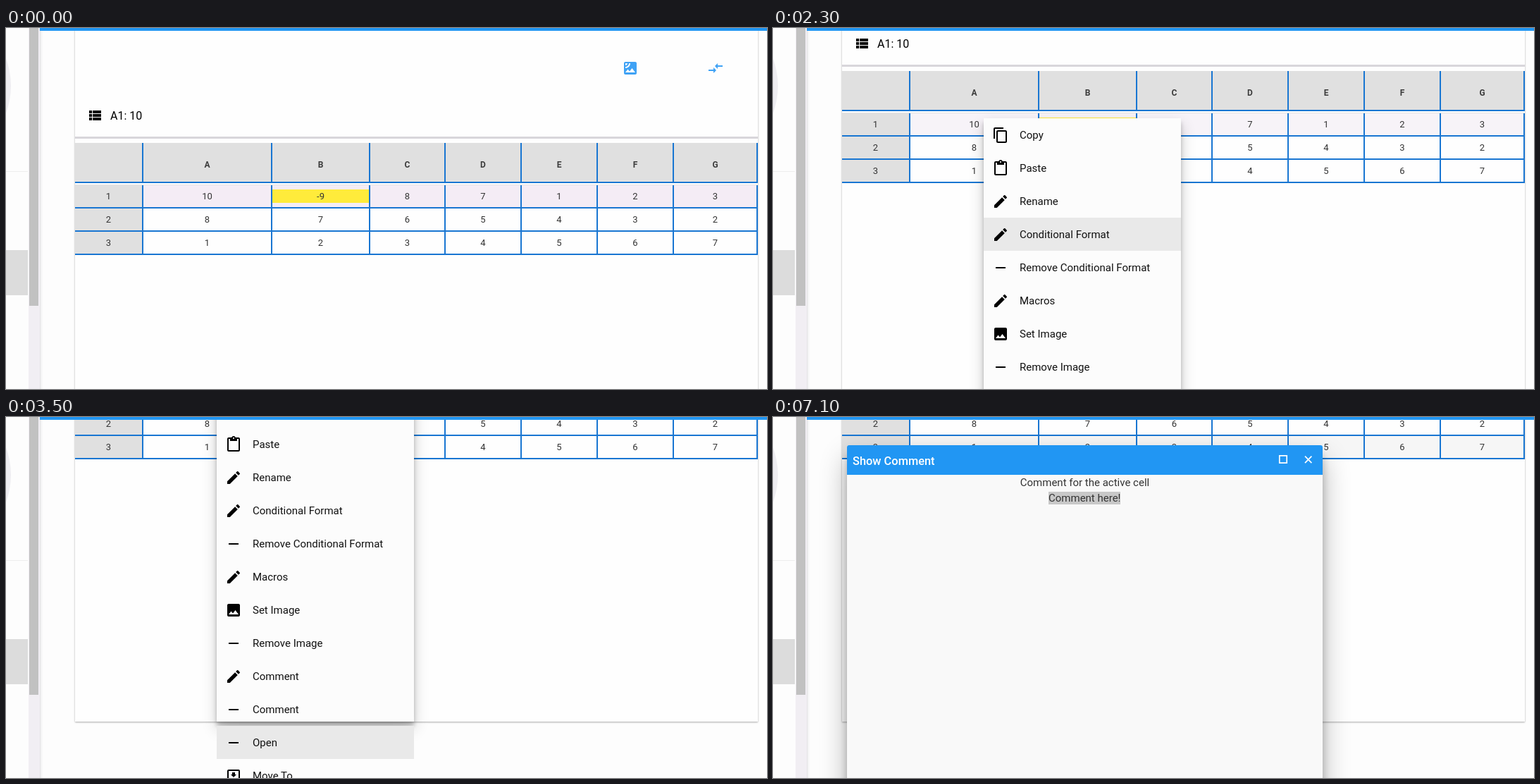
Recreate the animation shown at these times as an HTML page. Size 1080 by 512 pixels, loop 7200 ms.

```html
<!DOCTYPE html>
<html lang="en">
<head>
<meta charset="utf-8">
<title>Spreadsheet comment</title>
<style>
  html, body { margin: 0; width: 100%; height: 100%; overflow: hidden; background: #fdfdfd; }
  body { font: 15px/18px Roboto, Arial, sans-serif; color: #111; }
  div, svg { position: absolute; box-sizing: border-box; }
  div { white-space: nowrap; }
  .stage { left: 0; top: 0; width: 1080px; height: 512px; overflow: hidden; background: #fdfdfd; }
  .anim { animation: 7.2s step-end infinite; }

  /* Side drawer */
  .drawer { left: 0; top: 0; width: 32px; height: 512px; overflow: hidden; }
  .avatar { left: -213px; top: -28px; width: 220px; height: 220px; border-radius: 50%; background: #eeedf1; }
  .rule { left: 0; top: 203px; width: 31px; height: 1px; background: #eee; }
  .active { left: 0; top: 315px; width: 31px; height: 64px; background: #dcdcdc; }
  .track { left: 32px; top: 0; width: 16px; height: 512px; background: #f1eef3; }
  .thumb { left: 1px; top: 0; width: 13px; height: 394px; background: #c1c1c1; }
  .edge { left: 48px; top: 0; width: 4px; height: 512px; background: linear-gradient(90deg, #dedee0, #f3f3f4 40%, #fafafa); }
  .bar { left: 48px; top: 0; width: 1032px; height: 4px; background: #2196f3; }

  /* Sheet */
  .page { left: 0; top: 0; width: 1080px; height: 800px; animation-name: scroll; }
  .card { left: 98px; top: -30px; width: 969px; height: 724px; background: #fefefe;
    box-shadow: 0 1px 3px rgba(0,0,0,.12), 0 1px 2px rgba(0,0,0,.24); }
  .label { left: 148px; top: 115px; font-size: 16px; line-height: 19px; color: #000; }
  .divider { left: 98px; top: 154px; width: 969px; height: 3px; background: #d8d6db; }
  .gap { left: 98px; top: 222px; width: 969px; height: 1px; background: #e2e2e2; }
  .row { left: 98px; width: 969px; height: 33px; background: #fefefe; color: #333; }
  .cell { top: 0; height: 100%; border: solid #1976d2; border-width: 0 2px 2px 0;
    text-align: center; font-size: 13px; line-height: 31px; }
  .head, .num { background: #e0e0e0; }
  .head { font-size: 12px; font-weight: 700; line-height: 62px; color: #3c3c3c; }
  .mark { left: 0; top: 6px; width: 100%; height: 19px; line-height: 19px; background: #ffeb3b; }
  .row1 { animation-name: row1; }
  .row3 { animation-name: row3; }

  /* Context menu */
  .menu { left: 299px; top: 230px; width: 280px; height: 464px; background: #fcfcfc; animation-name: menu;
    box-shadow: 0 10px 20px rgba(0,0,0,.19), 0 6px 6px rgba(0,0,0,.23); }
  .hover { left: 0; top: 0; width: 280px; height: 47px; background: #e9e9e9; animation-name: hover; }
  .item { left: 0; width: 280px; height: 47px; padding-left: 51px; line-height: 48px; }
  .item svg { left: 12px; top: 12px; }

  /* Dialog */
  .dialog { left: 105px; top: 40px; width: 675px; height: 560px; background: #f9f9f9; border-radius: 3px; animation-name: dialog;
    box-shadow: 0 19px 38px rgba(0,0,0,.3), 0 15px 12px rgba(0,0,0,.22); }
  .title { left: 0; top: 0; width: 675px; height: 42px; padding: 13px 8px; border-radius: 3px 3px 0 0;
    background: #2196f3; color: #fff; font-size: 16.4px; font-weight: 500; line-height: 19px; }
  .title svg { left: 611px; top: 12px; }
  .line { left: 0; width: 675px; text-align: center; color: #333; }
  .picked { left: 286px; top: 66px; padding-right: 0; animation-name: pick; }

  @keyframes scroll {
    0% { transform: none; }
    25% { transform: translateY(-91px); }
    30.555% { transform: translateY(-93px); }
    31.944% { transform: translateY(-102px); }
    33.333% { transform: translateY(-150px); }
    34.722% { transform: translateY(-225px); }
    36.111%, 100% { transform: translateY(-262px); }
  }
  @keyframes row1 {
    0% { background: #f4ecf5; }
    5.555% { background: #efeaf0; }
    25% { background: #f4ecf5; }
    30.555%, 100% { background: #f7f3f8; }
  }
  @keyframes row3 {
    0% { background: #fefefe; }
    90.277% { background: #fafafa; }
    91.666%, 100% { background: #f6f6f6; }
  }
  @keyframes menu {
    0% { visibility: hidden; }
    25% { visibility: visible; }
    54.166%, 100% { visibility: hidden; }
  }
  @keyframes hover {
    0% { transform: translateY(94px); }
    31.944% { transform: translateY(141px); }
    33.333% { transform: translateY(188px); }
    34.722% { transform: translateY(329px); }
    36.111% { transform: translateY(376px); }
    44.444% { transform: translateY(423px); }
    48.611%, 100% { transform: translateY(470px); }
  }
  @keyframes dialog {
    0% { visibility: hidden; }
    54.166%, 100% { visibility: visible; }
  }
  @keyframes pick {
    0% { clip-path: inset(0 0 0 100%); background: #2f8dfd; color: #fff; }
    69.444% { clip-path: inset(0 0 0 98.7px); }
    70.833% { clip-path: inset(0 0 0 77.7px); }
    72.222% { clip-path: inset(0 0 0 52.6px); }
    73.611% { clip-path: inset(0 0 0 31.5px); }
    75% { clip-path: inset(0 0 0 9.8px); }
    77.777% { clip-path: inset(0); background: #2f8dfd; color: #fff; }
    98.611%, 100% { clip-path: inset(0); background: #c8c8c8; color: #333; }
  }
</style>
</head>
<body>
<div class="stage">
  <div class="page anim" id="page">
    <div class="card"></div>
    <div class="label">A1: 10</div>
    <div class="divider"></div>
    <div class="gap"></div>
    <div class="menu anim" id="menu"><div class="hover anim"></div></div>
  </div>
  <div class="drawer">
    <div class="avatar"></div><div class="rule"></div><div class="active"></div>
  </div>
  <div class="track"><div class="thumb"></div></div>
  <div class="edge"></div>
  <div class="bar"></div>
  <div class="dialog anim">
    <div class="title">Show Comment
      <svg width="54" height="18" fill="none" stroke="#fff" stroke-width="1.7">
        <path d="M2.8 2.8h10.4v10.4H2.8zM39 3.7l9.4 9.4M48.4 3.7L39 13.1"/>
      </svg>
    </div>
    <div class="line" style="top:44px">Comment for the active cell</div>
    <div class="line" style="top:66px">Comment here!</div>
    <div class="picked anim">Comment here!</div>
  </div>
</div>
<script>
  const icons = {
    satellite: "M19 3H5c-1.1 0-2 .9-2 2v14c0 1.1.9 2 2 2h14c1.1 0 2-.9 2-2V5c0-1.1-.9-2-2-2zM5 4.99h3C8 6.65 6.66 8 5 8V4.99zM5 12v-2c2.76 0 5-2.25 5-5.01h2C12 8.86 8.87 12 5 12zm0 6l3.5-4.5 2.5 3.01L14.5 12l4.5 6H5z",
    arrows: "M9.01 14H2v2h7.01v3L13 15l-3.99-4v3zm5.98-1v-3H22V8h-7.01V5L11 9l3.99 4z",
    list: "M4 14h4v-4H4zM4 19h4v-4H4zM4 9h4V5H4zM9 14h12v-4H9zM9 19h12v-4H9zM9 5v4h12V5z",
    copy: "M16 1H4c-1.1 0-2 .9-2 2v14h2V3h12V1zm3 4H8c-1.1 0-2 .9-2 2v14c0 1.1.9 2 2 2h11c1.1 0 2-.9 2-2V7c0-1.1-.9-2-2-2zm0 16H8V7h11v14z",
    paste: "M19 2h-4.18C14.4.84 13.3 0 12 0c-1.3 0-2.4.84-2.82 2H5c-1.1 0-2 .9-2 2v16c0 1.1.9 2 2 2h14c1.1 0 2-.9 2-2V4c0-1.1-.9-2-2-2zm-7 0c.55 0 1 .45 1 1s-.45 1-1 1-1-.45-1-1 .45-1 1-1zm7 18H5V4h2v3h10V4h2v16z",
    edit: "M3 17.25V21h3.75L17.81 9.94l-3.75-3.75L3 17.25zM20.71 7.04c.39-.39.39-1.02 0-1.41l-2.34-2.34c-.39-.39-1.02-.39-1.41 0l-1.83 1.83 3.75 3.75 1.83-1.83z",
    minus: "M19 13H5v-2h14z",
    image: "M21 19V5c0-1.1-.9-2-2-2H5c-1.1 0-2 .9-2 2v14c0 1.1.9 2 2 2h14c1.1 0 2-.9 2-2zM8.5 13.5l2.5 3.01L14.5 12l4.5 6H5l3.5-4.5z",
    inbox: "M19 3H5c-1.1 0-2 .9-2 2v14c0 1.1.9 2 2 2h14c1.1 0 2-.9 2-2V5c0-1.1-.9-2-2-2zm0 12h-4c0 1.66-1.35 3-3 3s-3-1.34-3-3H5V5h14v10zm-3-5h-2V7h-4v3H8l4 4 4-4z"
  };
  const items = [
    ["copy", "Copy"], ["paste", "Paste"], ["edit", "Rename"], ["edit", "Conditional Format"],
    ["minus", "Remove Conditional Format"], ["edit", "Macros"], ["image", "Set Image"],
    ["minus", "Remove Image"], ["edit", "Comment"], ["minus", "Comment"], ["minus", "Open"], ["inbox", "Move To"]
  ];
  const edges = [98, 195, 378, 517, 624, 732, 840, 948, 1067];
  const rows = [
    ["1", 10, -9, 8, 7, 1, 2, 3],
    ["2", 8, 7, 6, 5, 4, 3, 2],
    ["3", 1, 2, 3, 4, 5, 6, 7]
  ];

  const icon = (name, style = "", fill = "#000") =>
    `<svg width="24" height="24" style="${style}" fill="${fill}"><path d="${icons[name]}"/></svg>`;

  const cell = (text, i, type) =>
    `<div class="cell ${type}" style="left:${edges[i] - 98}px;width:${edges[i + 1] - edges[i]}px">${text}</div>`;

  const row = (values, r) => {
    const cells = values.map((v, i) =>
      cell(v === -9 ? `<div class="mark">${v}</div>` : v, i, i ? "" : "num"));
    return `<div class="row anim row${r + 1}" style="top:${223 + 33 * r}px">${cells.join("")}</div>`;
  };

  const heads = [..." ABCDEFG"].map((c, i) => cell(c, i, "head")).join("");
  const sheet =
    icon("list", "left:114px;top:112px") +
    icon("satellite", "left:874px;top:45px", "#3fa2f5") +
    icon("arrows", "left:995px;top:45px", "#3fa2f5") +
    `<div class="row" style="top:163px;height:57px">${heads}</div>` +
    rows.map(row).join("");

  const menu = document.getElementById("menu");
  menu.insertAdjacentHTML("beforebegin", sheet);
  menu.insertAdjacentHTML("beforeend", items.map(([name, text], i) =>
    `<div class="item" style="top:${47 * i}px">${icon(name)}${text}</div>`).join(""));
</script>
</body>
</html>
```
